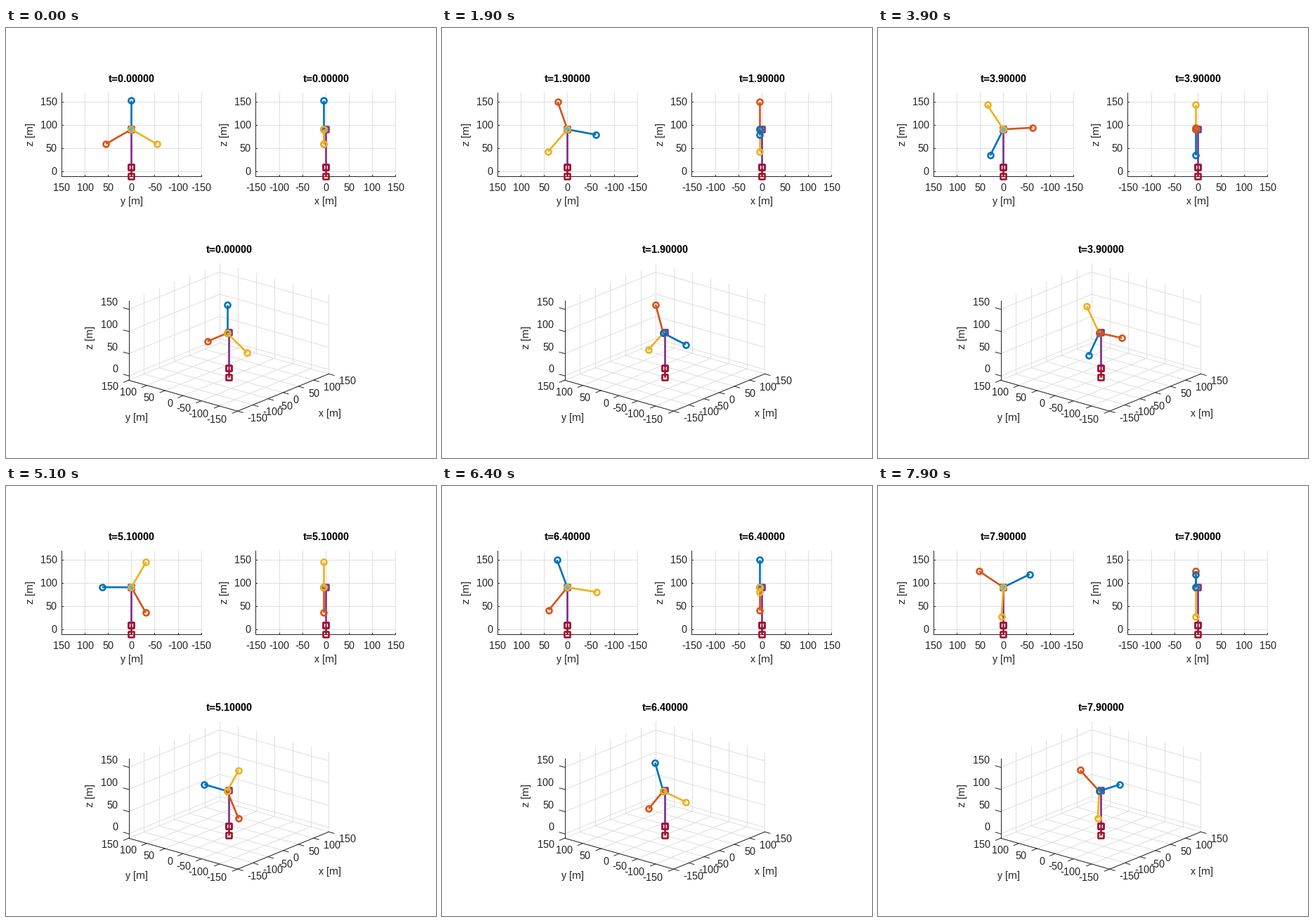
These frames come from a looping animation (612 px wide and 612 px high, 8000 ms). A matplotlib script:

```python
import numpy as np
import matplotlib.pyplot as plt
from matplotlib.animation import FuncAnimation
from matplotlib.markers import MarkerStyle

SIZE, DPI = 612, 96
FRAMES, STEP_MS = 80, 100
plt.rcParams.update({
    "font.family": "Liberation Sans",
    "font.size": 11,
    "text.hinting": "default",
    "text.hinting_factor": 1,
})

INK, GRID = "#262626", "#dedede"
BLADES = ["#0072bd", "#d95319", "#edb120"]
TOWER, SHAFT, BASE = "#7e2f8e", "#4dbeee", "#a2142f"
TICKS = range(-150, 151, 50)
Z_TICKS = range(0, 151, 50)
HUB_X, HUB_Z, RADIUS = -5, 90.6, 63
SCALE = 0.662

fig = plt.figure(figsize=(SIZE / DPI, SIZE / DPI), dpi=DPI, facecolor="white")
ax = fig.add_axes([0, 0, 1, 1])
ax.set_xlim(0, SIZE)
ax.set_ylim(SIZE, 0)
ax.axis("off")


# Projections from metres to stage pixels
def front(x, y, z):
    return 178.4 - SCALE * y, 204.2 - SCALE * z


def side(x, y, z):
    return 454.9 + SCALE * x, 204.2 - SCALE * z


def iso(x, y, z):
    return (317 + 0.4325 * x - 0.5167 * y,
            496.8 - 0.1767 * x - 0.1467 * y - 0.631 * (z + 10))


def thin(p, q, color=GRID, order=1):
    ax.plot([p[0], q[0]], [p[1], q[1]], color=color, lw=0.75, zorder=order)


def label(x, y, text, ha="center", **kw):
    kw.setdefault("color", INK)
    return ax.text(x, y, text, ha=ha, va="center", zorder=4, **kw)


def title(x, y):
    return label(x, y, "", color="black", weight="bold")


def flat_axes(left, names, name):
    """Plain 2D axes with light grid and dark left and bottom edges."""
    right, top, bottom = left + 198.6, 92, 210.8
    for k, text in enumerate(names):
        x = left + 33.1 * k
        thin((x, top), (x, bottom))
        thin((x, bottom), (x, bottom - 2), INK, 2)
        label(x + 0.5, 228.5, str(text))
    for z in Z_TICKS:
        y = front(0, 0, z)[1]
        thin((left, y), (right, y))
        thin((left, y), (left + 2, y), INK, 2)
        label(left - 6.5, y + 1.2, str(z), "right")
    thin((left, top), (left, bottom), INK, 2)
    thin((left, bottom), (right, bottom), INK, 2)
    label(left + 99.8, 247.5, name)
    label(left - 44.5, 151.5, "z [m]", rotation=90)


def iso_axes():
    lo, hi, z0, z1 = -150, 150, -10, 170
    for k, v in enumerate(TICKS):
        thin(iso(v, lo, z0), iso(v, hi, z0))
        thin(iso(lo, v, z0), iso(hi, v, z0))
        thin(iso(v, hi, z0), iso(v, hi, z1))
        thin(iso(hi, v, z0), iso(hi, v, z1))
        px, py = iso(v, lo, z0)
        thin((px, py), (px + 7.5, py + 2.1), INK, 2)
        label(343.5 + 21.7 * k, 556.3 - 8.85 * k, str(v), "left")
        px, py = iso(lo, -v, z0)
        thin((px, py), (px - 7.2, py + 2.9), INK, 2)
        label(160 + 25.75 * k, 511.3 + 7.8 * k, str(-v), "right")
    for k, z in enumerate(Z_TICKS):
        thin(iso(lo, hi, z), iso(hi, hi, z))
        thin(iso(hi, hi, z), iso(hi, lo, z))
        px, py = iso(lo, hi, z)
        thin((px, py), (px - 7.5, py - 2.1), INK, 2)
        label(159.5, 486.5 - 31.7 * k, str(z), "right")
    thin(iso(lo, hi, z0), iso(lo, hi, z1), INK, 2)
    thin(iso(lo, hi, z0), iso(lo, lo, z0), INK, 2)
    thin(iso(lo, lo, z0), iso(hi, lo, z0), INK, 2)
    label(185.5, 555.5, "y [m]")
    label(461, 549.5, "x [m]")
    label(120, 440.5, "z [m]", rotation=90)


def rod(color, shape, order):
    marker = MarkerStyle(shape, joinstyle="bevel") if shape else ""
    return ax.plot([], [], color=color, lw=2, marker=marker, ms=6, mew=2,
                   mfc="none", solid_capstyle="butt", zorder=order)[0]


def place(line, view, a, b):
    line.set_data(*zip(view(*a), view(*b)))


flat_axes(79, [-v for v in TICKS], "y [m]")
flat_axes(355.4, TICKS, "x [m]")
iso_axes()
titles = [title(178.5, 73), title(455.5, 73), title(317.5, 316)]

hub, tower_top = (HUB_X, 0, HUB_Z), (0, 0, HUB_Z)
foot, keel = (0, 0, 10), (0, 0, -10)
views = [front, side, iso]
blades = []
for view in views:
    place(rod(TOWER, "s", 5), view, foot, tower_top)
    place(rod(SHAFT, None, 6), view, hub, tower_top)
    place(rod(BASE, "s", 7), view, foot, keel)
    blades.append([rod(c, "o", 10) for c in BLADES])
ax.plot(*front(*hub), marker="+", ms=5, mew=1.7, color=SHAFT, zorder=20)


def rotor_angle(t):
    """Steady spin with a short speed-up late in the run, in degrees."""
    s = np.clip((t - 6.4) / 0.8, 0, 1)
    return 53 * t + 5 * s * s * (3 - 2 * s)


def draw(i):
    t = i * STEP_MS / 1000
    for text in titles:
        text.set_text(f"t={t:.5f}")
    for k in range(3):
        a = np.radians(rotor_angle(t) + (0, 240, 120)[k])
        y = -RADIUS * np.sin(a)
        tip = (HUB_X, y, HUB_Z + RADIUS * np.cos(a))
        for view, rods in zip(views, blades):
            place(rods[k], view, hub, tip)
            # nearer blades cover the farther ones
            rods[k].set_zorder(10 + k if view is front else 12 - y / 20)
    return titles + sum(blades, [])


anim = FuncAnimation(fig, draw, frames=FRAMES, interval=STEP_MS,
                     repeat=True, repeat_delay=0, blit=False)
plt.show()
```
